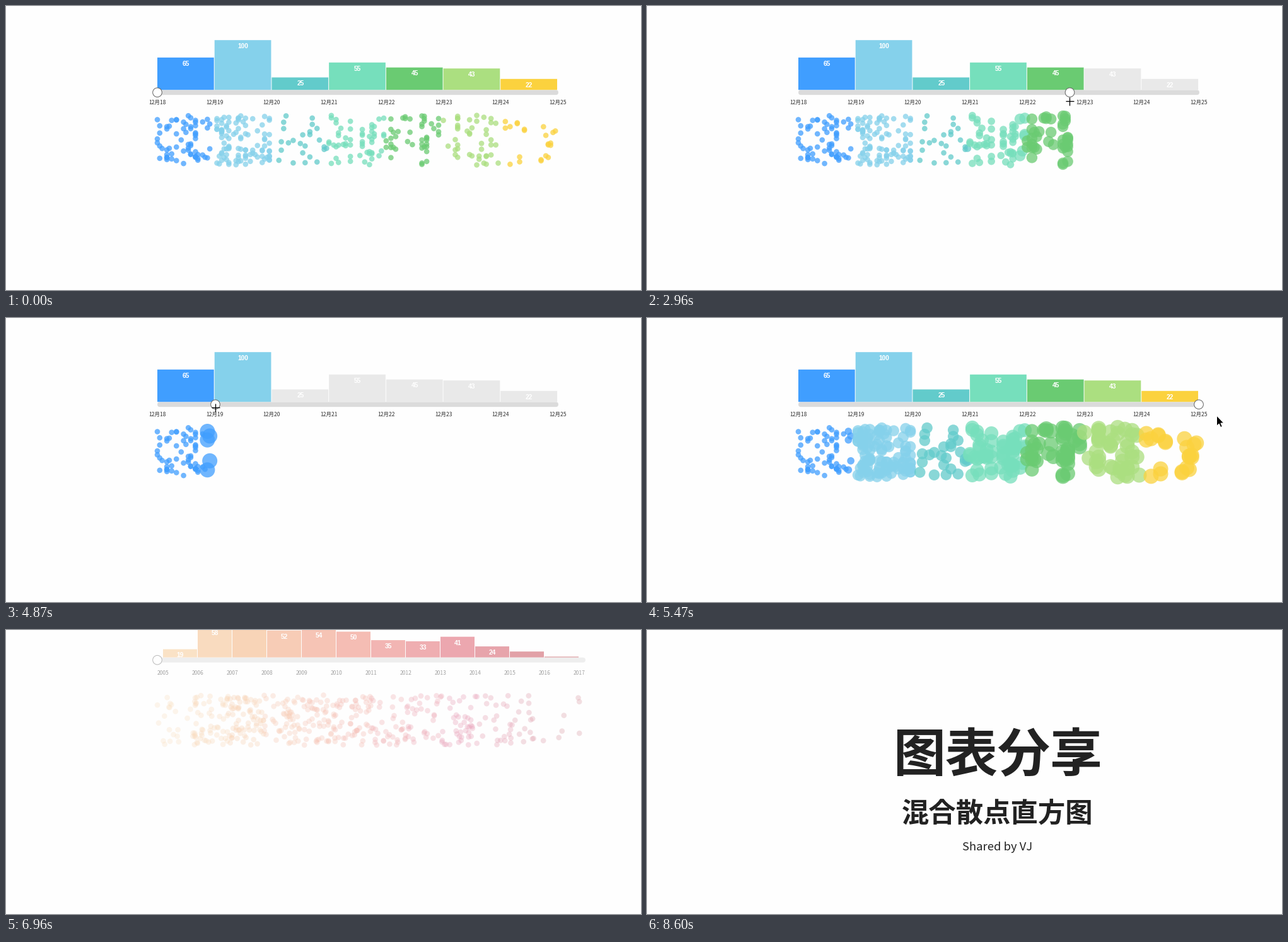
Write a matplotlib script that moves like this. It is 1007x451 px and loops after 9080 ms.

```python
import numpy as np
import matplotlib.pyplot as plt
from matplotlib.animation import FuncAnimation
from matplotlib.colors import to_rgb
from matplotlib.patches import Circle, FancyBboxPatch, Polygon, Rectangle

W, H, DPI = 1007, 451, 100
PT = 72 / DPI
LOOP, TICK = 9080, 20
PAPER, TRACK, OFF, INK = "#fefefe", "#dbdbdb", "#e9e9e9", "#222222"
CJK, SANS = "Noto Sans CJK JP", "Liberation Sans"
R_MIN, R_MAX, SHRINK = 4.3, 12, 930
rng = np.random.default_rng(18)

fig = plt.figure(figsize=((W + .01) / DPI, (H + .01) / DPI), dpi=DPI, facecolor=PAPER)


def stage(x0=0, x1=W):
    """Axes in stage pixels, y downwards, clipped to x0..x1."""
    ax = fig.add_axes([x0 / W, 0, (x1 - x0) / W, 1])
    ax.set(xlim=(x0, x1), ylim=(H, 0))
    ax.axis("off")
    return ax


def label(ax, x, y, s, px, color="#333333", font=CJK, weight="normal"):
    """Text whose capitals or ideographs are centred on (x, y)."""
    ax.text(x, y + .37 * px, s, size=px * PT, color=color, family=font, weight=weight,
            ha="center", va="baseline", clip_on=True, zorder=4)


def histogram(ax, x0, base, step, heights, colors, names):
    bars = []
    for i, (h, color, name) in enumerate(zip(heights, colors, names)):
        x = x0 + step * i
        bars.append(ax.add_patch(Rectangle((x, base - h), step - 1, h, fc=color, ec="none",
                                           snap=False, zorder=2)))
        label(ax, x + step / 2, base - h + 9, name, 10.3, "white", SANS, "bold")
    return bars


def ticks(ax, x0, y, step, names):
    for i, name in enumerate(names):
        label(ax, x0 + step * i, y, name, 8.5)


def slider(ax, x0, x1, y):
    ax.add_patch(FancyBboxPatch((x0 + 4, y), x1 - x0 - 8, 0, fc=TRACK, ec="none", zorder=1,
                                boxstyle="round,pad=3.9,rounding_size=3.9"))
    return ax.add_patch(Circle((x0, y), 7.3, fc="white", ec="#666666", lw=PT, zorder=5))


def area(r):
    return (2 * r * PT) ** 2


def scatter(ax, x, counts, colors, alpha):
    y = rng.uniform(173, 252.5, len(x))
    return ax.scatter(x, y, s=area(R_MIN), c=np.repeat(colors, counts, axis=0), alpha=alpha,
                      linewidths=0, zorder=3)


def ramp(n, at, stops):
    """n colours blended through the stops."""
    rgb = np.array([to_rgb(s) for s in stops])
    return np.column_stack([np.interp(np.arange(n), at, c) for c in rgb.T])


# ---- daily chart
X0, X1 = 240, 875
DAY = (X1 - X0) / 7
COUNTS = np.array([65, 100, 25, 55, 45, 43, 22])
COOL = ["#409eff", "#85d1eb", "#62cbcb", "#76dfbc", "#6acb72", "#abdf80", "#fbd23e"]


def busy_hours(n):
    """n whole hours of a day, some hours much busier than others."""
    weight = rng.uniform(.2, 1, 24) ** 2
    return rng.choice(24, n, p=weight / weight.sum())


daily = stage()
handle = slider(daily, X0, X1 + 1, 137.3)
bars = histogram(daily, X0, 133.2, DAY, .79 * COUNTS, COOL, map(str, COUNTS))
ticks(daily, X0, 153.3, DAY, [f"12月{d}" for d in range(18, 26)])
dot_x = np.concatenate([X0 + DAY * (d + busy_hours(n) / 24) for d, n in enumerate(COUNTS)])
cloud = scatter(daily, dot_x, COUNTS, COOL, .75)

cross, = daily.plot([0], [0], "+", color="black", ms=13 * PT, mew=1.3 * PT, zorder=6)
ARROW = np.array([(0, 0), (0, 16.5), (3.7, 13), (6.2, 18.6), (8.8, 17.4), (6.4, 12), (11.3, 12)])
arrow = daily.add_patch(Polygon(ARROW + (903.5, 155), fc="black", ec="white", lw=PT, zorder=6))

# ---- dragging the slider: back, forth, back, forth
STEPS = np.linspace(1340, 5895, 32)
LAST, RELEASE = len(STEPS) - 1, 28
KEYS = np.array([(0, 846), (5, 530), (6, 508), (8, 669), (11, 670.5), (13, 776), (18, 770),
                 (19, 761.5), (23, 316), (24, 332), (25, 512), (28, 875)])
DRAG = np.interp(np.arange(LAST + 1), *KEYS.T)
CURSOR_Y = np.interp(np.arange(LAST + 1), [0, 11, 14, 24, 27], [142, 151.5, 142.5, 142.5, 150])


def ease(p):
    p = np.clip(p, 0, 1)
    return np.where(p < .5, 4 * p ** 3, 1 - 4 * (1 - p) ** 3)


def drag_radii():
    """Dots pop in large as the slider passes them, then shrink."""
    clock = STEPS.copy()
    clock[-1] += SHRINK  # everything has settled when the drag ends
    born = np.full(len(dot_x), -1e9)
    seen = np.ones(len(dot_x), bool)
    out = []
    for now, x in zip(clock, DRAG):
        show = dot_x <= x
        born[show & ~seen] = now
        seen = show
        r = R_MAX - (R_MAX - R_MIN) * ease((now - born) / SHRINK)
        out.append(np.where(show, r, 0))
    return out


RADII = drag_radii()


def pose_daily(k):
    idle = k < 0
    x = X0 if idle else DRAG[k]
    handle.center = (x, 137.3)
    cloud.set_sizes(area(np.full(len(dot_x), R_MIN) if idle else RADII[k]))
    for d, b in enumerate(bars):
        b.set_facecolor(COOL[d] if idle or x >= X0 + DAY * d else OFF)
    cross.set_data([x - .5], [CURSOR_Y[k]])
    cross.set_visible(0 <= k < RELEASE)
    arrow.set_visible(RELEASE <= k < LAST)


# ---- yearly chart
YEARS = np.array([19, 58, 70, 52, 54, 50, 35, 33, 41, 24, 15, 6])
N = len(YEARS)
STOPS = [0, 2, 5, 8, 11]
WARM = ramp(N, STOPS, ["#f7c080", "#f29f5d", "#eb6b58", "#d6394c", "#b32530"])
DOT_WARM = ramp(N, STOPS, ["#f7c080", "#f29f5d", "#eb6b58", "#cf2c62", "#b32f40"])

yearly = stage(231, 919)
slider(yearly, X0, 919, 117.4)
histogram(yearly, 249, 113.3, 55, .902 * YEARS - 4.15, WARM,
          [str(n) if n > 15 else "" for n in YEARS])
ticks(yearly, 249, 137.3, 55, map(str, range(2005, 2018)))
year_x = X0 + 56.4 * (np.repeat(np.arange(N), YEARS) + rng.uniform(0, 1, YEARS.sum()))
scatter(yearly, year_x, YEARS, DOT_WARM, .34)

# ---- closing title
title = stage()
label(title, 556.5, 194.5, "图表分享", 83, INK, weight="bold")
label(title, 556, 289, "混合散点直方图", 43.4, INK, weight="bold")
label(title, 556, 343, "Shared by VJ", 18.4, INK)

veil = fig.add_artist(Rectangle((0, 0), 1, 1, transform=fig.transFigure, fc=PAPER,
                                ec="none", zorder=20))
YEARLY_IN = np.linspace(6810, 7410, 5)
TITLE_IN = np.linspace(8010, 8600, 5)


def step_at(times, t):
    return int(np.searchsorted(times, t, "right")) - 1


def drop_in(ax, times, t):
    """Slide down into place while fading in, in discrete steps."""
    p = max(step_at(times, t), 0) / (len(times) - 1)
    dy = -124 * (1 - p) ** 2
    ax.set_ylim(H - dy, -dy)
    veil.set_alpha(.75 * (1 - p))


def update(i):
    t = i * TICK + 15
    daily.set_visible(t < 6510)
    yearly.set_visible(YEARLY_IN[0] <= t < 7860)
    title.set_visible(t >= TITLE_IN[0])
    veil.set_alpha(0)
    if t < 6510:
        pose_daily(step_at(STEPS, t))
    elif t < 7860:
        drop_in(yearly, YEARLY_IN, t)
    else:
        drop_in(title, TITLE_IN, t)
    return []


anim = FuncAnimation(fig, update, frames=LOOP // TICK, interval=TICK, init_func=lambda: [],
                     repeat=True, repeat_delay=0, blit=False)
plt.show()
```
